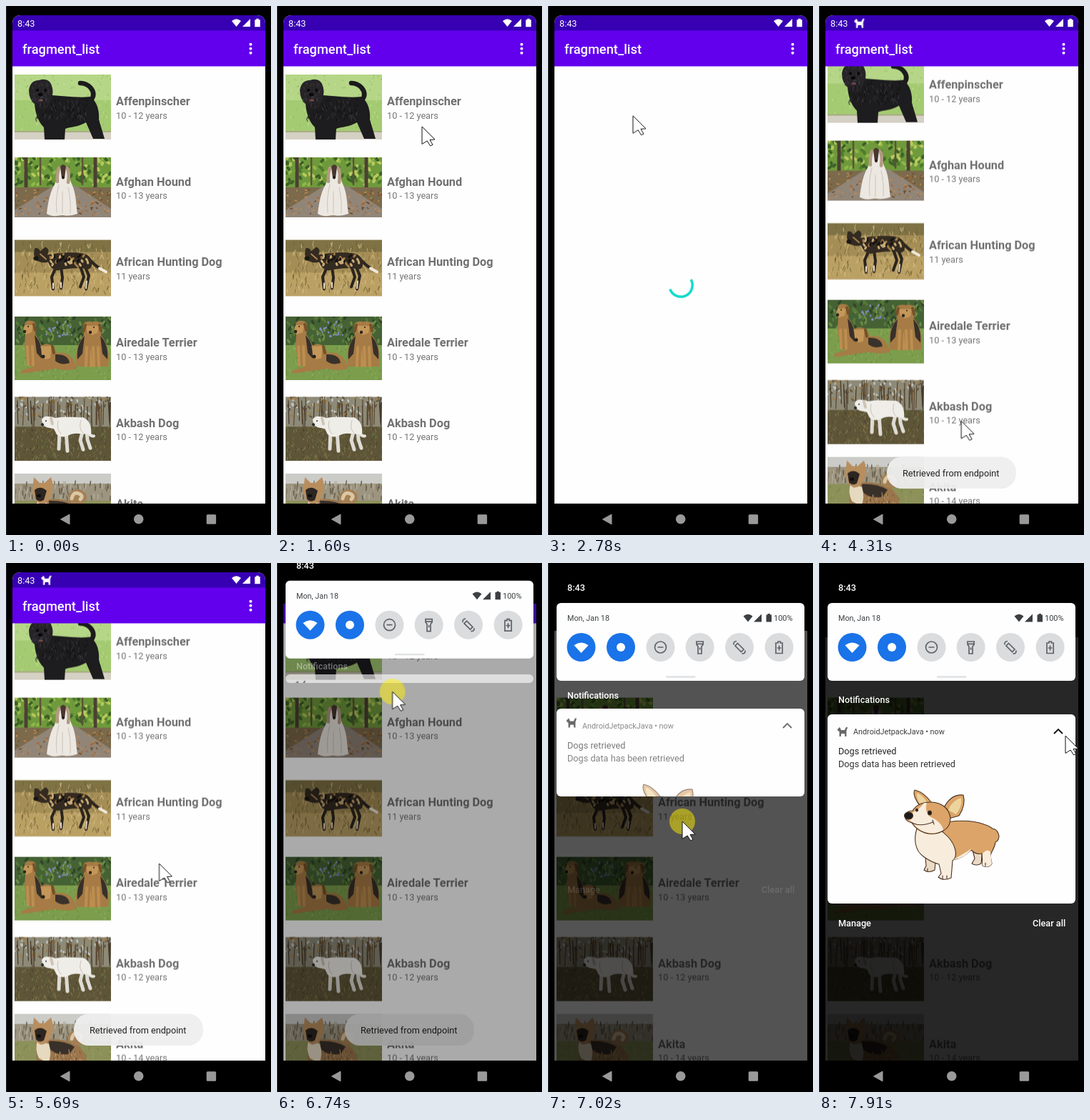
These frames come from a looping animation (371 by 741 pixels, 8000 ms). An HTML page:

```html
<!DOCTYPE html>
<html lang="en">
<head>
<meta charset="utf-8">
<title>fragment_list</title>
<style>
html, body { margin: 0; width: 100%; height: 100%; overflow: hidden; background: #000; }
body { position: relative; font-family: Roboto, sans-serif; }
body > svg { position: absolute; left: 0; top: 0; width: 371px; height: 741px; }
text { font-family: Roboto, sans-serif; font-size: 12.7px; }
.mid { font-weight: 500; }
.move { animation: 8s linear infinite both; }

#list { animation-name: scroll, listShow; animation-duration: 8s; }
@keyframes scroll {
  0%, 23.5% { transform: translateY(0); }
  33.1%, 100% { transform: translateY(-23.4px); }
}
@keyframes listShow {
  0%, 33.49% { opacity: 1; }
  33.5%, 40.6% { opacity: 0; }
  40.61%, 100% { opacity: 1; }
}

#pull { animation-name: pull; }
@keyframes pull {
  0%, 23.3% { transform: translate(186px, 60px); opacity: 1; }
  26.6% { transform: translate(186px, 190px); animation-timing-function: ease-out; }
  28.5%, 33.49% { transform: translate(186px, 143.5px); opacity: 1; }
  33.5%, 100% { transform: translate(186px, 60px); opacity: 0; }
}
#pullArc { animation-name: pullArc; }
@keyframes pullArc {
  0%, 23.3% { transform: rotate(-265deg); stroke-dasharray: 20 340; }
  26.6% { transform: rotate(-197deg); stroke-dasharray: 285 75; }
  29% { transform: rotate(-145deg); stroke-dasharray: 285 75; }
  33.5%, 100% { transform: rotate(-45deg); stroke-dasharray: 200 160; }
}

#wait { animation-name: wait; }
@keyframes wait {
  0%, 33.49% { opacity: 0; }
  33.5%, 40.6% { opacity: 1; }
  40.61%, 100% { opacity: 0; }
}
#waitArc { animation-name: waitArc; }
@keyframes waitArc {
  0%, 33.5% { transform: rotate(-50deg); stroke-dasharray: 215 145; }
  34.75% { transform: rotate(-30deg); stroke-dasharray: 190 170; }
  37.5% { transform: rotate(160deg); stroke-dasharray: 40 320; }
  40.6%, 100% { transform: rotate(290deg); stroke-dasharray: 270 90; }
}

#toast { animation-name: toast; }
@keyframes toast {
  0%, 41.6% { opacity: 0; }
  44%, 84.4% { opacity: 1; }
  87.4%, 100% { opacity: 0; }
}
#note { animation-name: note; }
@keyframes note {
  0%, 42.8% { opacity: 0; }
  45.6%, 100% { opacity: 1; }
}

#scrim { animation-name: scrim; }
@keyframes scrim {
  0%, 80.6% { opacity: 0; }
  86.12% { opacity: .5; }
  89.4%, 100% { opacity: .85; }
}
#plate { animation-name: plate; }
@keyframes plate {
  0%, 80.6% { transform: translateY(-104px); }
  86.12% { transform: translateY(-18px); }
  89.4%, 100% { transform: translateY(0); }
}
#panel { animation-name: panel; }
@keyframes panel {
  0%, 81% { transform: translateY(-170px); }
  85%, 100% { transform: translateY(0); }
}
#heading { animation-name: heading; }
@keyframes heading {
  0%, 83% { transform: translateY(-70px); opacity: 0; }
  86.12% { transform: translateY(-11px); opacity: 1; }
  89.4%, 100% { transform: translateY(0); opacity: 1; }
}
#card {
  position: absolute; left: 12px; width: 347px; overflow: hidden;
  background: #fefefe; border-radius: 6px; animation-name: card;
}
@keyframes card {
  0%, 83% { top: 130px; height: 0; opacity: 0; }
  85% { opacity: 1; }
  86.12% { top: 195px; height: 29px; opacity: 1; }
  89.4%, 90.6% { top: 212px; height: 218px; animation-timing-function: ease-out; }
  93.75%, 100% { top: 212px; height: 265px; opacity: 1; }
}
#card svg { position: absolute; left: 0; top: 0; }
#cardDog { animation-name: cardDog; }
@keyframes cardDog {
  0%, 86.12% { transform: translate(26px, 220px); }
  89.4%, 100% { transform: translate(26px, 229px); }
}
#cardBody { animation-name: cardBody; }
@keyframes cardBody {
  0%, 86.2% { opacity: 0; }
  88.8%, 100% { opacity: 1; }
}
#foot { animation-name: foot; }
@keyframes foot {
  0%, 87.5% { transform: translateY(-47px); opacity: 0; }
  89.4%, 90.6% { transform: translateY(-47px); opacity: 1; animation-timing-function: ease-out; }
  93.75%, 100% { transform: translateY(0); opacity: 1; }
}

#pointer { animation-name: pointer; }
@keyframes pointer {
  0%, 5.99% { transform: translate(309px, 760px); }
  6% { transform: translate(309px, 735px); }
  10% { transform: translate(240px, 400px); animation-timing-function: ease-out; }
  13.8% { transform: translate(198px, 185px); }
  15%, 20% { transform: translate(203px, 169px); }
  20.63%, 23.1% { transform: translate(203px, 163px); animation-timing-function: ease-in-out; }
  26.8% { transform: translate(258px, 470px); animation-timing-function: ease-in; }
  29% { transform: translate(250px, 448px); }
  32.9% { transform: translate(140px, 190px); }
  34.75% { transform: translate(119px, 154px); animation-timing-function: ease-out; }
  43%, 48.5% { transform: translate(75px, 42px); animation-timing-function: ease-in; }
  53.87% { transform: translate(199px, 581px); animation-timing-function: ease-out; }
  58.4%, 59% { transform: translate(221px, 636px); }
  60.9%, 65.4% { transform: translate(232px, 662px); animation-timing-function: ease-in; }
  71.12% { transform: translate(215px, 424px); animation-timing-function: ease-out; }
  75%, 80.8% { transform: translate(146px, 24px); }
  86.12% { transform: translate(170px, 264px); animation-timing-function: ease-out; }
  89.2%, 90.6% { transform: translate(195px, 400px); animation-timing-function: ease-in-out; }
  98.8%, 100% { transform: translate(345px, 242px); }
}
#press { animation-name: press; }
@keyframes press {
  0%, 23.1% { opacity: 0; }
  23.12%, 26.8% { opacity: 1; }
  26.82%, 80.4% { opacity: 0; }
  80.42%, 89.1% { opacity: 1; }
  89.12%, 100% { opacity: 0; }
}
</style>
</head>
<body>
<svg viewBox="0 0 371 741">
  <defs>
    <clipPath id="screen"><path d="M9 697V25Q9 13 21 13H351Q363 13 363 25V697Z"/></clipPath>
    <clipPath id="page"><path d="M9 84.5H363V697H9Z"/></clipPath>
    <path id="fan" d="M0 3Q6.5 -2.4 13 3L6.5 11Z"/>
    <path id="bars" d="M0 11L11 0V11Z"/>
    <path id="cell" d="M0 1.4H2V0H5.5V1.4H7.5V11.5H0Z"/>
    <path id="dog" d="M0 3.4L2 2.3 2.6 .8 4 2.4 4.8 5H10L11.2 2 13 .5 14 1.4 12.4 6V14H10.4L9.8 10H5.2L4.6 14H2.5V7.2L0 5.6Z"/>
  </defs>
  <path d="M.5 0V741" stroke="#22262d"/>
  <g clip-path="url(#screen)">
    <path d="M9 13H363V697H9Z" fill="#fefefe"/>
    <g clip-path="url(#page)">
      <g id="list" class="move"></g>
      <g id="wait" class="move"><g transform="translate(186 391)">
        <circle id="waitArc" class="move" r="16.2" fill="none" stroke="#0cd9c8" stroke-width="3.5" pathLength="360"/>
      </g></g>
      <g id="pull" class="move">
        <circle r="19" cy="1" fill="#000" opacity=".07"/>
        <circle r="18" fill="#fafafa"/>
        <circle id="pullArc" class="move" r="8.3" fill="none" stroke="#2b2b33" stroke-width="2.5" pathLength="360"/>
      </g>
    </g>
    <path d="M9 13H363V35H9Z" fill="#3700b3"/>
    <path d="M9 34.5H363V84.5H9Z" fill="#6200ee"/>
    <g fill="#fff">
      <text x="16" y="28.5">8:43</text>
      <text x="23" y="67" class="mid" style="font-size:18.3px">fragment_list</text>
      <use id="note" class="move" href="#dog" x="49.5" y="16.8"/>
      <use href="#fan" x="316" y="18"/>
      <use href="#bars" x="331" y="18"/>
      <use href="#cell" x="348.3" y="17.8"/>
      <circle cx="342.5" cy="53.8" r="2"/><circle cx="342.5" cy="59.8" r="2"/><circle cx="342.5" cy="65.8" r="2"/>
    </g>
    <g id="toast" class="move">
      <rect x="95" y="631.5" width="181" height="44.5" rx="21" fill="#eee" opacity=".94"/>
      <text x="117" y="658.5" fill="#222">Retrieved from endpoint</text>
    </g>
    <path id="scrim" class="move" d="M9 13H363V697H9Z"/>
  </g>
  <g fill="#999">
    <path d="M76.5 719L89 712V726Z" stroke="#999" stroke-linejoin="round"/>
    <circle cx="185.7" cy="718.8" r="6.8"/>
    <rect x="280.7" y="712.3" width="13.4" height="13.4" rx="1.5"/>
  </g>
</svg>

<svg viewBox="0 0 371 741">
  <path id="plate" class="move" d="M1 -100H371V104H1Z"/>
  <g id="heading" class="move"><text x="27" y="195.5" class="mid" fill="#fff" style="font-size:12.5px">Notifications</text></g>
  <g id="panel" class="move">
    <text x="27" y="39" class="mid" fill="#fff">8:43</text>
    <rect x="12" y="56" width="347" height="109" rx="6" fill="#fefefe"/>
    <g fill="#3c4043">
      <text x="27" y="81" style="font-size:10.8px">Mon, Jan 18</text>
      <text x="316" y="81" style="font-size:11px">100%</text>
      <use href="#fan" x="273.5" y="71.5"/>
      <use href="#bars" x="288" y="71.5"/>
      <use href="#cell" x="305.5" y="71"/>
    </g>
    <rect x="165" y="158.3" width="41.5" height="2.4" rx="1.2" fill="#dfe1e3"/>
    <g id="tiles"></g>
    <use href="#fan" transform="translate(36.4 111.2) scale(1.55 1.35)" fill="#fff"/>
    <circle cx="102" cy="118" r="6" fill="#fff"/>
    <g fill="none" stroke="#5f6368" stroke-width="1.7">
      <path d="M153.5 118H161.5M149.5 118a8 8 0 1 0 16 0a8 8 0 1 0 -16 0"/>
      <path d="M208 110H217.2V114L215 117V127H210V117L208 114ZM208 113.4H217.2M212.6 118.5V121.5"/>
      <path d="M265.5 112.5L274 121L270.5 124.5L262 116ZM260 114.5Q259.5 109.5 264 109.5M276 122.5Q276.5 127.5 271.5 126.8"/>
      <path d="M319 112H322V110H325.4V112H328.2V126.5H319ZM323.6 115.5V122.5M320.8 119H326.4"/>
    </g>
  </g>
  <g id="foot" class="move" fill="#fff">
    <text x="27" y="508.7" class="mid">Manage</text>
    <text x="299" y="508.7" class="mid">Clear all</text>
  </g>
</svg>

<div id="card" class="move">
  <svg width="347" height="265" viewBox="12 212 347 265">
    <g id="cardDog" class="move"><use href="#dog" fill="#686868"/></g>
    <g id="cardBody" class="move">
      <g fill="#3c3c3c">
        <text x="48" y="240" style="font-size:10.8px">AndroidJetpackJava • now</text>
        <text x="27" y="268.2" fill="#222">Dogs retrieved</text>
        <text x="27" y="286" fill="#333">Dogs data has been retrieved</text>
      </g>
      <path d="M329 239L335 233L341 239" fill="none" stroke="#111" stroke-width="1.9"/>
      <g id="corgi" stroke="#4a3324" stroke-width="1.1" stroke-linejoin="round"></g>
    </g>
  </svg>
</div>

<svg viewBox="0 0 371 741">
  <g id="pointer" class="move">
    <circle id="press" class="move" r="18" fill="#fff000" opacity="0" fill-opacity=".5"/>
    <path d="M0 0L18 18L11 18.6L15 25.4L11.6 27L7.2 20L0 24.5Z" fill="#fff" stroke="#111"/>
  </g>
</svg>

<script>
const $ = id => document.getElementById(id);
let seed = 7;
const rnd = () => (seed = seed * 16807 % 2147483647) / 2147483647;
const shape = (fill, d) => `<path d="${d}" fill="${fill}"/>`;
const line = (stroke, w, d) => `<path d="${d}" fill="none" stroke="${stroke}" stroke-width="${w}" stroke-linecap="round" stroke-linejoin="round"/>`;
const oval = (fill, x, y, rx, ry = rx) => `<ellipse cx="${x}" cy="${y}" rx="${rx}" ry="${ry}" fill="${fill}"/>`;
const band = (fill, y, h) => `<rect y="${y}" width="135" height="${h}" fill="${fill}"/>`;

// Scattered short strokes: grass, leaves, fur
function specks(colors, n, x, y, w, h, dx, dy, size = 1) {
  return colors.map(c => {
    let d = '';
    for (let i = 0; i < n; i++) d += `M${(x + rnd() * w).toFixed(1)} ${(y + rnd() * h).toFixed(1)}l${(rnd() * dx - dx / 2).toFixed(1)} ${-dy}`;
    return line(c, size, d);
  }).join('');
}

const affen = () =>
  band('#b5d687', 0, 91) + band('#a4cb72', 36, 48) +
  specks(['#c5e09c', '#93bd5f'], 60, 0, 2, 135, 76, 3, 2) +
  band('#d5d0c4', 81, 10) + band('#a9ad83', 79, 2) +
  line('#1c1b1c', 6.5, 'M107 36Q114 27 106 18Q100 12 92 12') +
  shape('#1d1c1e', 'M28 30C50 26 82 34 106 31C116 38 119 52 118 63L126 90H110L100 67C88 74 78 73 71 76L70 91H42L41 74C31 64 27 48 28 30Z') +
  shape('#262427', 'M20 22Q22 8 34 8Q46 4 51 13Q56 24 51 35L46 46Q36 51 30 43Q20 36 20 22Z') +
  specks(['#3a383c', '#111113'], 45, 30, 36, 72, 30, 5, 4) +
  specks(['#403d42'], 22, 24, 13, 24, 26, 5, 3) +
  oval('#0a0a0b', 32, 22, 2.2) + oval('#0a0a0b', 43, 22, 2.2) + oval('#08080a', 36, 28, 3.2, 2.5) + oval('#7a4a50', 37, 36, 3, 1.5);

const afghan = () =>
  band('#6f9a3c', 0, 48) + specks(['#8fb84a', '#4d7a2c', '#b9c95c', '#3c6027'], 34, 0, 0, 135, 40, 6, 2, 4) +
  line('#4d4032', 5, 'M16 0V44M113 0V46') + line('#5d5238', 2.5, 'M36 0V38M95 0V38') +
  band('#7b6a4c', 42, 42) + shape('#918578', 'M54 40H86L135 72V84H0V74Z') +
  specks(['#a8662f', '#6a4d2f', '#c18b51'], 38, 0, 46, 135, 36, 6, 1, 1.6) +
  shape('#ece8e1', 'M64 14Q67 7 71 14C76 24 77 31 80 37C87 52 86 69 88 79Q78 83 66 81Q52 84 45 79C47 63 49 50 56 38C60 30 60 23 64 14Z') +
  line('#d1c9bf', 1.2, 'M62 38Q57 58 59 77M75 42Q79 60 78 78M67 48V78') +
  line('#b39a83', 4.5, 'M62 15Q59 24 60 34M74 15Q77 24 75 35') +
  shape('#49372f', 'M64 13Q68 7 72 13L70 29Q68 32 66 29Z') + oval('#1b1717', 68, 28, 1.8);

const hunting = () =>
  band('#a58e56', 0, 79) + band('#7f7345', 0, 17) + band('#bba064', 46, 33) +
  specks(['#c9b075', '#85703d', '#d9c48c', '#6f6437'], 58, 0, 6, 135, 73, 5, 5, .9) +
  line('#2b241e', 4, 'M59 36L52 52L54 69M65 38L67 53L65 68M98 36L104 50L100 69M92 37L97 52L92 66') +
  line('#e4dac7', 2, 'M54 61V68M65 60V67M101 58L100 68') +
  line('#2e251d', 4, 'M105 28Q113 36 118 39') + line('#efe8d9', 4, 'M119 40L128 45') +
  shape('#332a21', 'M27 20L28 12Q33 10 36 16L43 10Q50 13 46 21C58 19 78 16 96 19Q109 22 108 36Q106 44 96 40C82 39 70 41 60 43Q50 41 47 31Q39 34 29 28Z') +
  specks(['#a47c45', '#15120f', '#c8ab76'], 13, 50, 21, 53, 17, 6, 2, 3) +
  oval('#1a1613', 30, 26, 3.5, 3) + line('#aa834d', 2, 'M36 20L44 27');

function sitter(x, y, flip) {
  return `<g transform="translate(${x} ${y}) scale(${flip} 1)">` +
    shape('#a77b45', 'M-7 3Q-5 -3 2 -2Q9 -2 9 5L8 17C17 29 21 42 18 61H-3L-7 34L-6 16Z') +
    shape('#37302a', 'M7 18Q19 30 17 51L10 43Z') +
    shape('#c49759', 'M-7 4Q-11 13 -5 17L3 14L5 4Z') + line('#765129', 4, 'M6 3L8 11') +
    line('#bc8e50', 4, 'M-3 34L-2 60M4 34L5 60') + oval('#29231f', -7, 13, 2.2) + oval('#211c18', -2, 6, 1) + '</g>';
}
const airedale = () =>
  band('#456234', 0, 48) + specks(['#2d4526', '#6e8c48', '#577a3a'], 36, 0, 0, 135, 40, 6, 3, 3) +
  specks(['#818cc0'], 22, 42, 8, 42, 22, 2, 1, 2) +
  band('#7b9d4c', 40, 49) + specks(['#92b461', '#648840'], 55, 0, 44, 135, 45, 3, 2) +
  sitter(21, 8, 1) + sitter(105, 9, -1) + sitter(113, 9, 1) +
  shape('#a77b45', 'M36 42Q44 35 55 42L59 51C72 48 85 56 87 73Q74 77 58 73L10 80L9 76L38 66Q36 57 40 53Z') +
  shape('#39322b', 'M57 53Q75 52 77 65Q65 69 57 62Z') +
  shape('#c49759', 'M37 42L52 41L50 58Q41 62 38 55Z') + line('#765129', 4, 'M53 42L55 51') + oval('#27211d', 40, 56, 2.5);

const akbash = () =>
  band('#8d8a78', 0, 46) + specks(['#bfc4c2', '#665740', '#9b7d4c'], 34, 0, 0, 135, 30, 5, 2, 2.5) +
  specks(['#463a2b', '#5d4b35'], 18, 0, 32, 135, 14, 4, 32, 1.3) +
  band('#5e5538', 42, 48) + specks(['#78703f', '#473f2c', '#8c7c50', '#657344'], 55, 0, 44, 135, 46, 5, 3) +
  line('#dedbd5', 5, 'M63 46L62 73M72 48L74 76M96 45L92 61L96 74M101 46L102 60L106 72') +
  line('#e8e5df', 4, 'M100 40Q104 57 111 55') +
  shape('#efede8', 'M38 32Q41 26 49 28Q54 28 57 30C68 27 84 29 96 29Q109 35 107 53L94 52Q82 50 76 54Q66 59 59 53L55 45L45 43Q38 40 38 32Z') +
  line('#c9c2b8', 1, 'M61 34Q58 44 65 52M93 33Q89 45 96 51') + line('#cfc5b5', 4, 'M51 30L53 38') +
  oval('#29282a', 39, 39, 2) + oval('#29282a', 44, 34, 1);

const akita = () =>
  band('#cbcbc8', 0, 100) + band('#9d9580', 14, 26) + specks(['#827660', '#b4ad9c', '#665f4e'], 30, 0, 16, 135, 22, 3, 6, 1.5) +
  band('#8c9159', 38, 62) + specks(['#a19f66', '#717d46'], 60, 0, 42, 135, 58, 4, 3) +
  shape('#9b764c', 'M30 38C55 33 70 36 86 42Q103 53 101 76L99 100H85L80 78H56L54 100H32Z') +
  oval('#a48056', 88, 33, 13, 11) + line('#dbc7a4', 5, 'M80 35Q82 25 90 28Q97 31 92 36') +
  shape('#383029', 'M48 38Q70 37 84 46L77 56Q59 59 49 49Z') +
  shape('#e5d9c0', 'M32 37L48 42Q53 57 47 69L34 62Q28 50 32 37Z') +
  shape('#b98e5e', 'M25 23L27 5L35 13L42 13L51 5Q56 18 51 31Q47 43 37 43Q27 39 25 23Z') +
  shape('#2c2622', 'M28 23Q36 16 45 24L41 37Q35 41 30 36Z') + oval('#0f0e0e', 34, 31, 3, 2.3) +
  specks(['#c7a374', '#6f5338'], 20, 53, 53, 43, 21, 4, 3);

const dogs = [
  ['Affenpinscher', '10 - 12 years', 96, 91, affen],
  ['Afghan Hound', '10 - 13 years', 212, 84, afghan],
  ['African Hunting Dog', '11 years', 327.5, 79, hunting],
  ['Airedale Terrier', '10 - 13 years', 435, 89.5, airedale],
  ['Akbash Dog', '10 - 12 years', 547.3, 90, akbash],
  ['Akita', '10 - 14 years', 655, 100, akita]
];
$('list').innerHTML = dogs.map(([name, age, y, h, photo], i) => {
  const base = 139 + i * 112.7;
  return `<svg x="12" y="${y}" width="135" height="${h}" overflow="hidden">${photo()}</svg>` +
    `<text x="154" y="${base}" fill="#707070" style="font-size:16.3px;font-weight:700">${name}</text>` +
    `<text x="154" y="${base + 18.5}" fill="#757575">${age}</text>`;
}).join('');

$('tiles').innerHTML = [46.5, 102, 157.5, 212.6, 268, 323.6]
  .map((x, i) => oval(i < 2 ? '#1a73e8' : '#dadcdd', x, 118, 20)).join('');

const tan = '#dca468', cream = '#f8ecdc';
$('corgi').innerHTML =
  shape('#ead9c4', 'M148 402L150 424L147 430Q153 435 162 430L164 408Z') +
  shape('#ead9c4', 'M214 398L218 414L214 421Q220 425 227 421L229 400Z') +
  shape(tan, 'M162 367C188 359 216 360 231 366Q238 368 243 372Q250 373 252 382Q252 389 247 391C246 400 241 404 240 410L242 421Q238 428 229 424L228 407Q220 409 213 402C204 411 195 415 186 416C176 416 160 405 150 390Z') +
  shape(cream, 'M137 372C132 388 135 403 146 411C154 417 161 420 168 422L171 435L167 440Q174 446 185 441L187 417C196 410 190 394 181 384Q168 370 155 368Z') +
  `<path d="M229 407Q236 399 240 405L242 421Q238 428 229 424ZM187 416Q203 407 214 400Q206 413 187 416Z" fill="${cream}" stroke="none"/>` +
  shape(tan, 'M143 342C135 333 131 323 134 318Q147 321 157 335Z') +
  shape(tan, 'M174 345C180 331 190 324 202 325Q206 339 196 354L182 358Z') +
  `<path d="M181 346Q187 332 199 329Q201 341 192 352ZM141 337Q136 328 137 322Q146 326 151 335Z" fill="#ecd59c" stroke="none"/>` +
  shape(tan, 'M121 353Q123 347 131 347C136 339 145 335 156 335C171 335 182 343 184 357Q184 370 174 375C157 385 138 377 130 364Q119 361 121 353Z') +
  `<path d="M123 358L132 349Q141 345 147 336L151 336Q147 347 155 355C166 360 173 367 174 374C157 384 139 376 131 363Z" fill="${cream}" stroke="none"/>` +
  line('#4a3324', 1.1, 'M130 364Q143 370 159 363M159 360L161 366M173 438V442M179 438V442M152 428V432M233 420V424') +
  oval('#1d1a1a', 125.5, 354, 6, 5) + oval('#1d1a1a', 155, 350, 2.5, 3) + oval('#1d1a1a', 137, 346, 1.5, 2);
</script>
</body>
</html>
```
